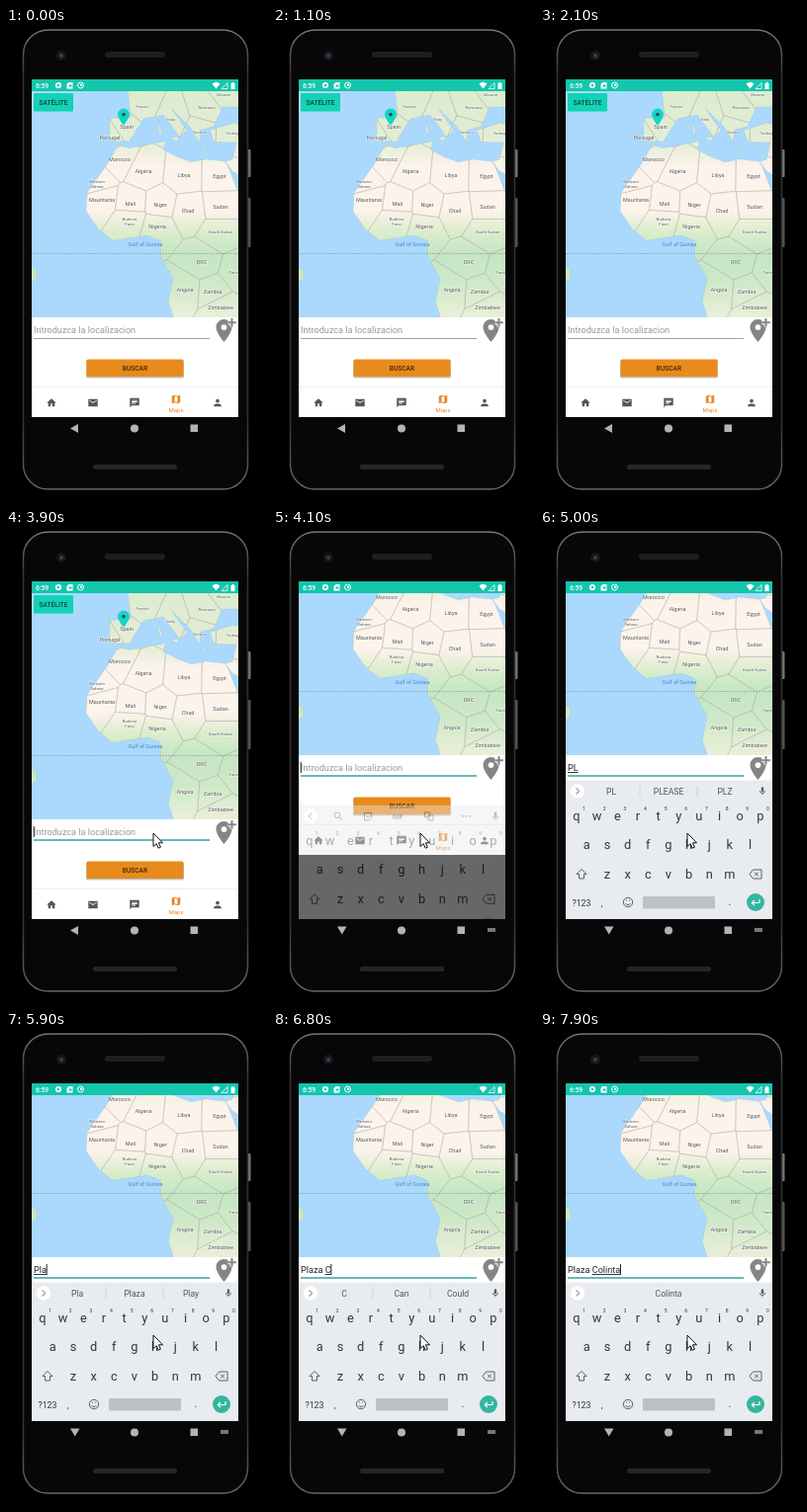
Animation of 264 by 480 pixels, one loop 8000 ms. Source, as an HTML page:

```html
<!DOCTYPE html>
<html lang="es">
<head>
<meta charset="utf-8">
<title>Maps</title>
<style>
  html, body { margin: 0; height: 100%; overflow: hidden; background: #000; }
  svg { display: block; width: 100vw; height: 100vh; font-family: Roboto, sans-serif; }
  text { white-space: pre; }
  .mid { text-anchor: middle; }
  .label { font-size: 5.5px; fill: #555; stroke: #fff; stroke-width: 1px; stroke-opacity: .7; paint-order: stroke; }
  .small { font-size: 4.3px; }
  .sea { fill: #4b86c4; stroke: none; }
  .line { fill: none; stroke: #5b6065; stroke-width: 1; }
</style>
</head>
<body>
<svg viewBox="0 0 264 480">
  <defs>
    <linearGradient id="land" gradientUnits="userSpaceOnUse" x1="0" y1="64" x2="0" y2="293">
      <stop offset="0" stop-color="#dcecd0"/>
      <stop offset=".22" stop-color="#e3edd4"/>
      <stop offset=".34" stop-color="#fdf3ec"/>
      <stop offset=".53" stop-color="#fcf3ea"/>
      <stop offset=".62" stop-color="#dcedcd"/>
      <stop offset=".72" stop-color="#c4e6c3"/>
      <stop offset=".85" stop-color="#cfe9c8"/>
      <stop offset="1" stop-color="#eaefd9"/>
    </linearGradient>
    <linearGradient id="rim" x1="0" y1="0" x2="0" y2="1">
      <stop offset="0" stop-color="#777"/><stop offset=".1" stop-color="#333"/>
      <stop offset=".85" stop-color="#333"/><stop offset="1" stop-color="#666"/>
    </linearGradient>
    <clipPath id="screen"><path d="M26 64H235V394H26z"/></clipPath>
    <clipPath id="mapArea"><path d="M26 64H235V293H26z"/></clipPath>
    <clipPath id="landArea"><path id="landClip"/></clipPath>
  </defs>

  <!-- phone body -->
  <rect x="244" y="123" width="3.500" height="28" rx="1" fill="#777"/>
  <rect x="244" y="172" width="3.500" height="50" rx="1" fill="#555"/>
  <rect x="17.500" y="2" width="227" height="465" rx="25" fill="#070707" stroke="url(#rim)" stroke-width="1.500"/>
  <rect x="100" y="24" width="61" height="6" rx="3" fill="#1e1e1e"/>
  <circle cx="56" cy="28" r="5" fill="#15181d"/>
  <circle cx="56" cy="28" r="2" fill="#3a3f58"/>
  <rect x="88" y="442" width="85" height="5" rx="2.500" fill="#262626"/>

  <g clip-path="url(#screen)">
    <g id="app">
      <rect x="26" y="64" width="209" height="330" fill="#fff"/>
      <g clip-path="url(#mapArea)">
        <rect x="26" y="64" width="209" height="229" fill="#aad9fd"/>
        <g id="map"></g>
        <path d="M26 228.500H235" stroke="#8f8a90" stroke-width=".7" stroke-dasharray="2 1" opacity=".8"/>
        <g id="labels"></g>
      </g>
      <rect x="28" y="66" width="40" height="18.500" rx="1" fill="#12d3b6"/>
      <text class="mid" x="48" y="77.700" font-size="6.600" font-weight="500" fill="#143f3a">SATÉLITE</text>

      <text id="hint" x="28" y="309" font-size="9.150" fill="#999">Introduzca la localizacion</text>
      <text id="entry" x="28" y="309" font-size="9.150" fill="#222"><tspan id="done"></tspan><tspan id="word" text-decoration="underline"></tspan></text>
      <rect id="caret" y="300" width="1" height="11" fill="#222"/>
      <rect id="fieldLine" x="28" width="178"/>
      <g id="addPin"></g>
      <path d="M228.500 294v8.500M224.200 298.200h8.600" stroke="#fff" stroke-width="4"/>
      <path d="M228.500 294v8.500M224.200 298.200h8.600" stroke="#858585" stroke-width="2"/>

      <rect x="81" y="336.500" width="99" height="18" rx="1.500" fill="#999" opacity=".6"/>
      <rect x="81.500" y="335.500" width="98" height="17.500" rx="1.500" fill="#e88b1c"/>
      <text class="mid" x="130.500" y="347" font-size="6.600" font-weight="500" fill="#40280a">BUSCAR</text>
      <path d="M26 363.500H235" stroke="#eee"/>
      <g id="tabs"></g>
      <text class="mid" x="172" y="389" font-size="6" fill="#e8862a">Maps</text>
    </g>

    <g id="keyboard">
      <rect x="26" y="253.500" width="209" height="180" fill="#e8ebef"/>
      <circle cx="38" cy="264.500" r="7.200" fill="#fff"/>
      <path id="chevron" class="line" stroke-width="1.300"/>
      <g id="tools" class="line">
        <circle cx="65" cy="263.500" r="2.800"/><path d="M67 265.500l3 3"/>
        <path d="M92.500 261h7v5l-2.500 2.500h-4.500zM94.500 264.500q1.500 2 3 0"/>
        <path d="M153.500 260.500h5v5h-5zM157 263.500h5v5h-5z"/>
        <path d="M191 264.500h8.500" stroke-width="1.600" stroke-dasharray="1.600 1.800"/>
        <text class="mid" x="126" y="267.300" font-size="7" font-weight="700" fill="#5b6065" stroke="none">GIF</text>
      </g>
      <g id="suggestions" class="mid" font-size="8.600" fill="#50565c">
        <text x="72" y="267.500"></text><text x="130" y="267.500"></text><text x="187" y="267.500"></text>
        <path id="dividers" d="M101 259v11M159 259v11" stroke="#c8ccd0" stroke-width=".8"/>
      </g>
      <g id="mic"></g>
      <g id="keys" class="mid" fill="#32373c"></g>
      <path class="line" d="M42 343.500l-5 5h2.500v4.500h5v-4.500h2.500z"/>
      <path class="line" d="M212 348.500l3.500-4.500h8.500v9h-8.500zM217 346.500l4 4m0-4l-4 4"/>
      <g class="line"><circle cx="89" cy="377" r="4.700"/><path d="M86.500 378q2.500 3.500 5 0M87 375h1M90 375h1"/></g>
      <rect x="104" y="371" width="73" height="12.500" rx="1" fill="#bdc1c5"/>
      <circle cx="218" cy="377" r="9" fill="#35b5a0"/>
      <path d="M222 374v3.500h-7.500m2.500-2.700l-2.700 2.700 2.700 2.700" fill="none" stroke="#fff" stroke-width="1.200"/>
    </g>
  </g>

  <!-- status bar -->
  <rect x="26" y="52" width="209" height="12" fill="#13c6ac"/>
  <g fill="#fff">
    <text x="30" y="60.500" font-size="6.700" font-weight="500">6:59</text>
    <circle cx="53" cy="58" r="2.200" fill="none" stroke="#fff" stroke-width="1.800"/>
    <path d="M61.500 57l2-2h4v6.500h-6zM63.500 57.500h3v2h-3z" fill-rule="evenodd"/>
    <circle cx="75.500" cy="58" r="3" fill="none" stroke="#fff"/><circle cx="76" cy="57.700" r="1.200"/>
    <path d="M208.500 56.500q4-3.500 8 0l-4 5z"/>
    <path d="M218 61.500l6-6v6z" fill="none" stroke="#fff" stroke-width=".8"/>
    <path d="M227.500 56h1v-1h2v1h1v6h-4z"/>
  </g>

  <!-- system navigation -->
  <g fill="#b4b4b4">
    <path id="back"/>
    <circle cx="130" cy="405.500" r="4"/>
    <rect x="186.500" y="401.500" width="7.500" height="7.500"/>
    <rect id="keyboardIcon" x="217" y="403" width="8" height="4" fill="#777"/>
  </g>
  <path id="pointer" d="M0 0V13.500L3.200 10.700 5.200 15.200 7.400 14.200 5.400 9.800H9.500z" fill="#fff" stroke="#111"/>
</svg>

<script>
const $ = id => document.getElementById(id);
const LOOP = 8000, STEP = 100;

// Web Mercator with the equator at y = 228
const DEGREE = 2.85;
const project = point => {
  const [lon, lat] = point.split(',').map(Number);
  const y = 228 - DEGREE * 180 / Math.PI * Math.asinh(Math.tan(lat * Math.PI / 180));
  return [130.5 + DEGREE * lon, y];
};
const polygon = points => 'M' + points.map(p => p.map(v => v.toFixed(1))).join('L') + 'z';

const coasts = [
  '32,31 25,31.7 20,30.8 15,32.3 10,34.5 11,37 -2,35 -6,35.8 -10,30 -17,21 -17.4,14.7 -13,8.5 -8,4.4 4.4,6.3 9,4.5 9,-1 13.5,-9 11.8,-17 15,-26 40,-26 38,18 33,29.5',
  '40,52 40,46 31,46 28,41 23,40 23,36.5 19.4,41 13,45.5 18.4,40 16,38 10,44 3,43 -2,36.8 -9,37 -9,43.2 -1.5,43.5 -3,52',
  '32,31 34.5,31.5 36,36.5 28,36.7 26.5,40 35,42 40,41 40,25 34.5,28',
  '12.5,38 15.5,38.2 15,36.8', '8.5,43 9.5,39.2 8.5,39', '24,35.6 26,35.2 24,35',
  '-40,-3 -35,-6 -35,-9 -40,-13',
];
const land = coasts.map(coast => polygon(coast.split(' ').map(project))).join('');

const countries = [
  ['France', 138, 79, 'small'], ['Italy', 167, 92, 'small'], ['Romania', 203, 80, 'small'], ['Ukraine', 220, 67, 'small'],
  ['Greece', 196, 105, 'small'], ['Turkey', 229, 106, 'small'], ['Spain', 122, 100], ['Portugal', 105, 111],
  ['Morocco', 115, 133], ['Algeria', 139, 145], ['Libya', 180, 149], ['Egypt', 216, 149.500],
  ['Western\nSahara', 92, 155, 'small'], ['Mauritania', 97, 174], ['Mali', 126, 177.500], ['Niger', 156, 179],
  ['Chad', 184, 185], ['Sudan', 217, 181], ['Burkina\nFaso', 125, 193, 'small'], ['Nigeria', 153, 201],
  ['South Sudan', 217, 206, 'small'], ['DRC', 198, 237], ['Angola', 181, 265], ['Zambia', 209, 267],
  ['Zimbabwe', 217, 283], ['Tanzania', 234, 247, 'small'],
];

// Borders: each country is the area nearest to its label
function cell(site) {
  let shape = [[0, 0], [264, 0], [264, 320], [0, 320]];
  for (const other of countries) {
    if (other === site) continue;
    const [dx, dy] = [other[1] - site[1], other[2] - site[2]];
    const side = ([x, y]) => (x - site[1] - dx / 2) * dx + (y - site[2] - dy / 2) * dy;
    shape = shape.flatMap((p, i) => {
      const q = shape[(i + 1) % shape.length], a = side(p), b = side(q), k = a / (a - b);
      const kept = a <= 0 ? [p] : [];
      return a * b < 0 ? [...kept, p.map((v, axis) => v + (q[axis] - v) * k)] : kept;
    });
  }
  return polygon(shape);
}
$('landClip').setAttribute('d', land);
$('map').innerHTML =
  `<path d="${land}" fill="url(#land)" stroke="#9cc3cf" stroke-width=".4"/>
   <path d="${countries.map(cell).join('')}" clip-path="url(#landArea)" fill="none" stroke="#a3a49c" stroke-width=".45" opacity=".7"/>`;

const icons = {
  home: 'M10 20v-6h4v6h5v-8h3L12 3 2 12h3v8z',
  mail: 'M2 4h20v16H2zM20 6l-8 5-8-5v2l8 5 8-5z',
  chat: 'M2 2h20v16H6l-4 4zM6 6v2h12V6zM6 9v2h12V9zM6 12v2h8v-2z',
  map: 'M3 5l6-2 6 2 6-2v16l-6 2-6-2-6 2zM9 5v12l6 2V7z',
  person: 'M12 4a4 4 0 0 1 0 8 4 4 0 0 1 0-8zM4 20v-2c0-5 16-5 16 0v2z',
  place: 'M12 2a7 7 0 0 0-7 7c0 5 7 13 7 13s7-8 7-13a7 7 0 0 0-7-7zM12 6.500a2.500 2.500 0 0 1 0 5 2.500 2.500 0 0 1 0-5z',
  mic: 'M12 2a3 3 0 0 1 3 3v6a3 3 0 0 1-6 0V5a3 3 0 0 1 3-3zM5 11h2a5 5 0 0 0 10 0h2a7 7 0 0 1-6 7v3h-2v-3a7 7 0 0 1-6-7z',
};
const icon = (name, x, y, scale, color) =>
  `<path d="${icons[name]}" fill="${color}" fill-rule="evenodd" transform="translate(${x} ${y}) scale(${scale}) translate(-12 -12)"/>`;
const label = (words, x, y, style = '') => words.split('\n').map((line, i) =>
  `<text class="label mid ${style}" x="${x}" y="${y + 2 + 4.5 * i}">${line}</text>`).join('');

$('labels').innerHTML = countries.map(entry => label(...entry)).join('') + label('Gulf of Guinea', 141, 218.5, 'sea') +
  icon('place', 119, 90, .85, '#12d6c6') + '<circle cx="119" cy="87.500" r="2" fill="#105c58"/>';
$('addPin').innerHTML = icon('place', 220.5, 306.5, 1.15, '#858585');
$('mic').innerHTML = icon('mic', 225, 264.5, .42, '#5b6065');
$('tabs').innerHTML = ['home', 'mail', 'chat', 'map', 'person'].map((name, i) =>
  icon(name, 46 + 42 * i, name === 'map' ? 376 : 379.5, .47, name === 'map' ? '#e8862a' : '#555')).join('');

const keyRow = (letters, x, y, size = 12.8) => [...letters].map((c, i) =>
  `<text x="${x + 20.65 * i}" y="${y}" font-size="${size}">${c}</text>`).join('');
$('keys').innerHTML = keyRow('qwertyuiop', 37, 293.5) + keyRow('asdfghjkl', 47.3, 322.5) + keyRow('zxcvbnm', 68, 352.5) +
  keyRow('1234567890', 44.5, 284, 5) + keyRow(['?123', ','], 42, 380.5, 8.8) + keyRow('.', 192, 380, 11);

const FOCUS = 3600, CARET = 3900, OPEN = 4050;
const BACKSPACE = '<', strokes = 'PL' + BACKSPACE + 'laza Colinta';
const strokeTime = i => i < 2 ? 4400 + 100 * i : 5400 + 205 * (i - 2);
const vocabulary = ['Please', 'Plz', 'Plaza', 'Play', 'Can', 'Could'];

function typed(t) {
  let text = '', since = CARET;
  [...strokes].forEach((key, i) => {
    if (strokeTime(i) > t) return;
    text = key === BACKSPACE ? text.slice(0, -1) : text + key;
    since = strokeTime(i);
  });
  return { text, since };
}
function suggest(word) {
  const shout = word.length > 1 && word === word.toUpperCase();
  const matches = vocabulary.filter(entry => entry !== word && entry.toLowerCase().startsWith(word.toLowerCase()))
    .map(entry => shout ? entry.toUpperCase() : entry);
  return matches.length ? [word, ...matches] : ['', word];
}

const pointerKeys = [[2400, 245, 347], [2700, 168, 320], [2950, 168, 320], [3100, 149, 307]];
function pointerAt(t) {
  const next = pointerKeys.findIndex(key => key[0] > t);
  if (next < 0) return pointerKeys.at(-1).slice(1);
  const [from, to] = [pointerKeys[next - 1], pointerKeys[next]];
  const k = (t - from[0]) / (to[0] - from[0]);
  return [1, 2].map(axis => from[axis] + (to[axis] - from[axis]) * k);
}

const show = (id, on) => $(id).style.display = on ? '' : 'none';
const set = (id, attributes) => Object.entries(attributes).forEach(([name, value]) => $(id).setAttribute(name, value));

function draw(t) {
  const { text, since } = typed(t);
  const focused = t >= FOCUS, open = t > OPEN;

  set('app', { transform: `translate(0 ${open ? -65 : 0})` });
  set('fieldLine', focused ? { y: 313.3, height: 1.4, fill: '#2a9c96' } : { y: 314, height: .8, fill: '#8a8a8a' });

  const split = text.lastIndexOf(' ') + 1, word = text.slice(split);
  $('done').textContent = text.slice(0, split);
  $('word').textContent = word;
  set('caret', { x: 27.7 + (text ? $('entry').getComputedTextLength() : 0) });
  show('caret', t >= CARET && (t - since) % 1000 < 500);
  show('hint', !text);

  const rise = Math.min(1, Math.max(0, (t - OPEN) / 200));
  set('keyboard', { transform: `translate(0 ${60 * (1 - rise) ** 3})`, opacity: open ? Math.min(1, rise + .17) : 0 });
  const options = suggest(word);
  show('tools', !text);
  show('suggestions', word);
  show('dividers', options[0]);
  document.querySelectorAll('#suggestions text').forEach((node, i) => node.textContent = options[i] || '');
  set('chevron', { d: text ? 'M36.700 261.500l3 3-3 3' : 'M39.200 261.500l-3 3 3 3' });

  set('back', { d: open ? 'M65 401.500h9.500l-4.750 8z' : 'M65 405.500l8-4.500v9z' });
  show('keyboardIcon', open);

  const visible = t >= 2500;
  show('pointer', visible);
  if (visible) set('pointer', { transform: `translate(${pointerAt(t)})` });
}

const start = performance.now();
function tick() {
  const t = (performance.now() - start) % LOOP;
  draw(Math.floor(t / STEP) * STEP);
  requestAnimationFrame(tick);
}
tick();
</script>
</body>
</html>
```
